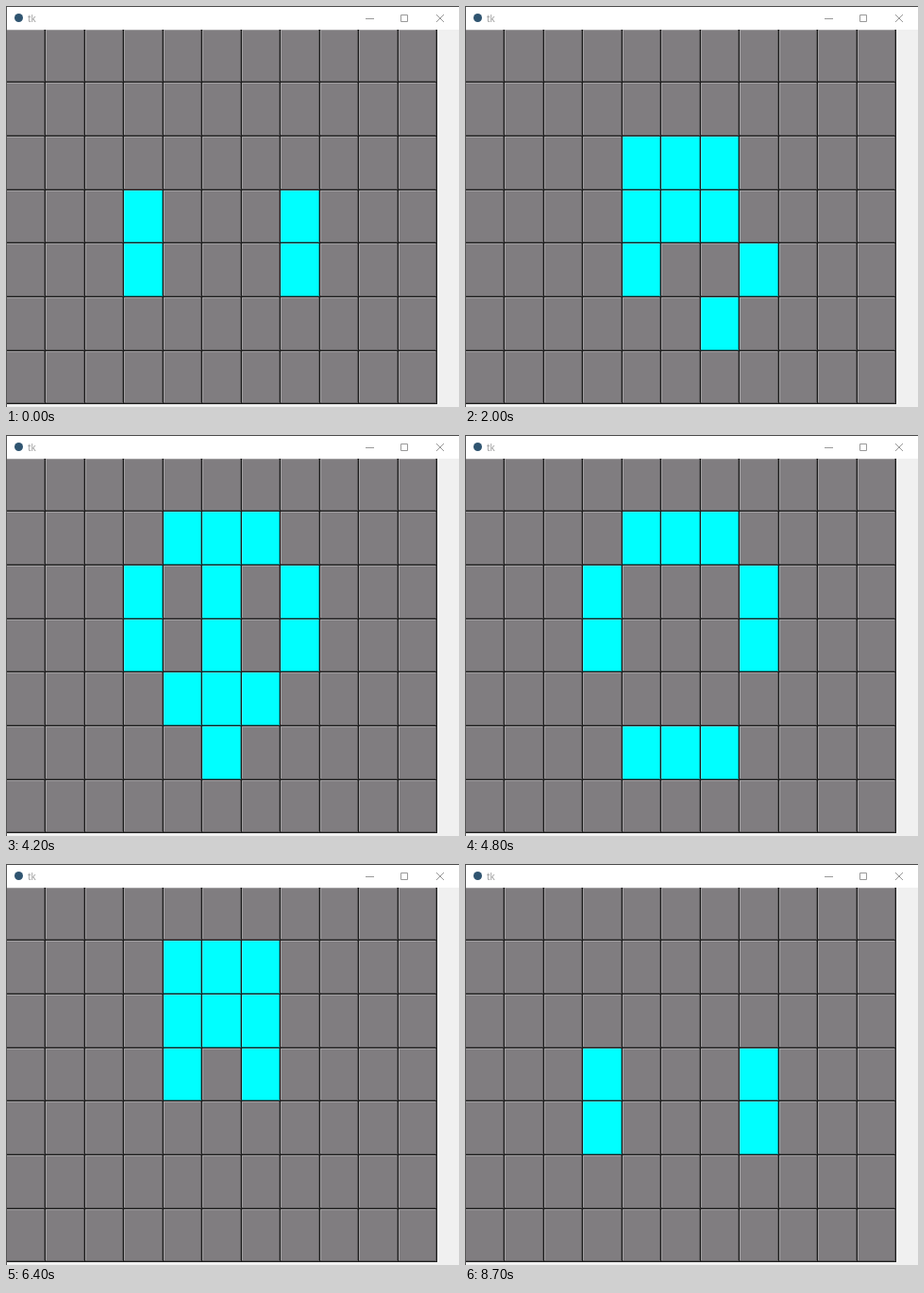
An HTML page with a canvas that plays this animation: 480 by 424 pixels, repeating every 8800 ms.

```html
<!DOCTYPE html>
<html lang="en">
<head>
<meta charset="utf-8">
<title>tk</title>
<style>
  html, body { margin: 0; width: 100%; height: 100%; overflow: hidden; background: #f0f0f0; }
  #win { position: relative; width: 480px; height: 424px; background: #f0f0f0; overflow: hidden; }
  #bar { position: absolute; left: 0; top: 0; width: 480px; height: 25px; background: #fff; }
  #bar span { position: absolute; left: 23px; top: 5px; font: 10px/16px "Open Sans", "Noto Sans", sans-serif; color: #999; }
  #bar svg { position: absolute; left: 0; top: 0; }
  canvas { position: absolute; left: 0; top: 0; }
  #edge { position: absolute; inset: 0; border-top: 1px solid #4a4a4a; border-left: 1px solid #555; }
</style>
</head>
<body>
<div id="win">
  <canvas id="board" width="480" height="424"></canvas>
  <div id="bar">
    <svg width="480" height="25" fill="none" stroke="#999">
      <circle cx="13.5" cy="12.5" r="4.5" fill="#2f5470" stroke="none"/>
      <path d="M381 13.5h9M418.5 9.5h7v7h-7zM456 9l8 8M464 9l-8 8"/>
    </svg>
    <span>tk</span>
  </div>
  <div id="edge"></div>
</div>
<script>
const COLS = 11, ROWS = 7, LOOP = 8800;
const GREY = { fill: '#807d80', light: '#a3a1a3', dark: '#5c5a5c' };
const CYAN = { fill: '#00ffff', light: '#40ffff', dark: '#00a8a8' };
const ctx = document.getElementById('board').getContext('2d');

const edgeX = i => i ? Math.floor(41.5 * i) + 1 : 0;
const edgeY = j => j ? Math.floor(24.2 + 56.65 * j) + 1 : 25;

const board = (...cells) => {
  const b = Array.from({ length: ROWS }, () => Array(COLS).fill(0));
  for (const [c, r] of cells) b[r][c] = 1;
  return b;
};

// Game of Life; the outermost cells always stay dead
const evolve = b => b.map((row, r) => row.map((on, c) => {
  if (r < 1 || c < 1 || r > ROWS - 2 || c > COLS - 2) return 0;
  let n = -on;
  for (let y = r - 1; y <= r + 1; y++)
    for (let x = c - 1; x <= c + 1; x++) n += b[y][x];
  return n === 3 || (on && n === 2) ? 1 : 0;
}));

const blank = board();
const split = (top, bottom) => top.map((row, r) => r <= 3 ? row : bottom[r]);

// [time, redraw]: a redraw caught halfway shows for 100 ms
const STEPS = [
  [800, 'wipe'], [1400], [1900, 'wipe'], [2500], [3100], [3600], [4200],
  [4700, 'wipe'], [5200, 'wipe'], [5800, 'wipe'], [6400, 'fill'],
  [6900, 'wipe'], [7500, 'wipe'], [8100], [8600, 'wipe']
];

const seed = board([4, 2], [5, 3], [5, 4], [6, 4], [6, 5], [7, 5]);
const rest = board([3, 3], [3, 4], [7, 3], [7, 4]);
const timeline = [[0, rest], [300, seed]];
let cur = seed;
for (const [t, redraw] of STEPS) {
  const next = evolve(cur);
  if (redraw) timeline.push([t, redraw === 'wipe' ? split(blank, cur) : split(next, blank)]);
  timeline.push([redraw ? t + 100 : t, next]);
  cur = next;
}

function box(color, x, y, w, h) {
  ctx.fillStyle = color;
  ctx.fillRect(x, y, w, h);
}

function drawCell(c, r, on) {
  const { fill, light, dark } = on ? CYAN : GREY;
  const x = edgeX(c), y = edgeY(r);
  const w = edgeX(c + 1) - x, h = edgeY(r + 1) - y;
  box('#1e1e1e', x, y, w, h);
  box(dark, x, y, w - 1, h - 1);
  box(light, x, y, w - 2, h - 2);
  box(fill, x + 1, y + 1, w - 3, h - 3);
}

let shown;
function frame(now) {
  const t = now % LOOP;
  const state = timeline.findLast(([start]) => start <= t)[1];
  if (state !== shown) {
    state.forEach((row, r) => row.forEach((on, c) => drawCell(c, r, on)));
    shown = state;
  }
}

const start = performance.now();
function tick() {
  frame(performance.now() - start);
  requestAnimationFrame(tick);
}
tick();
</script>
</body>
</html>
```
